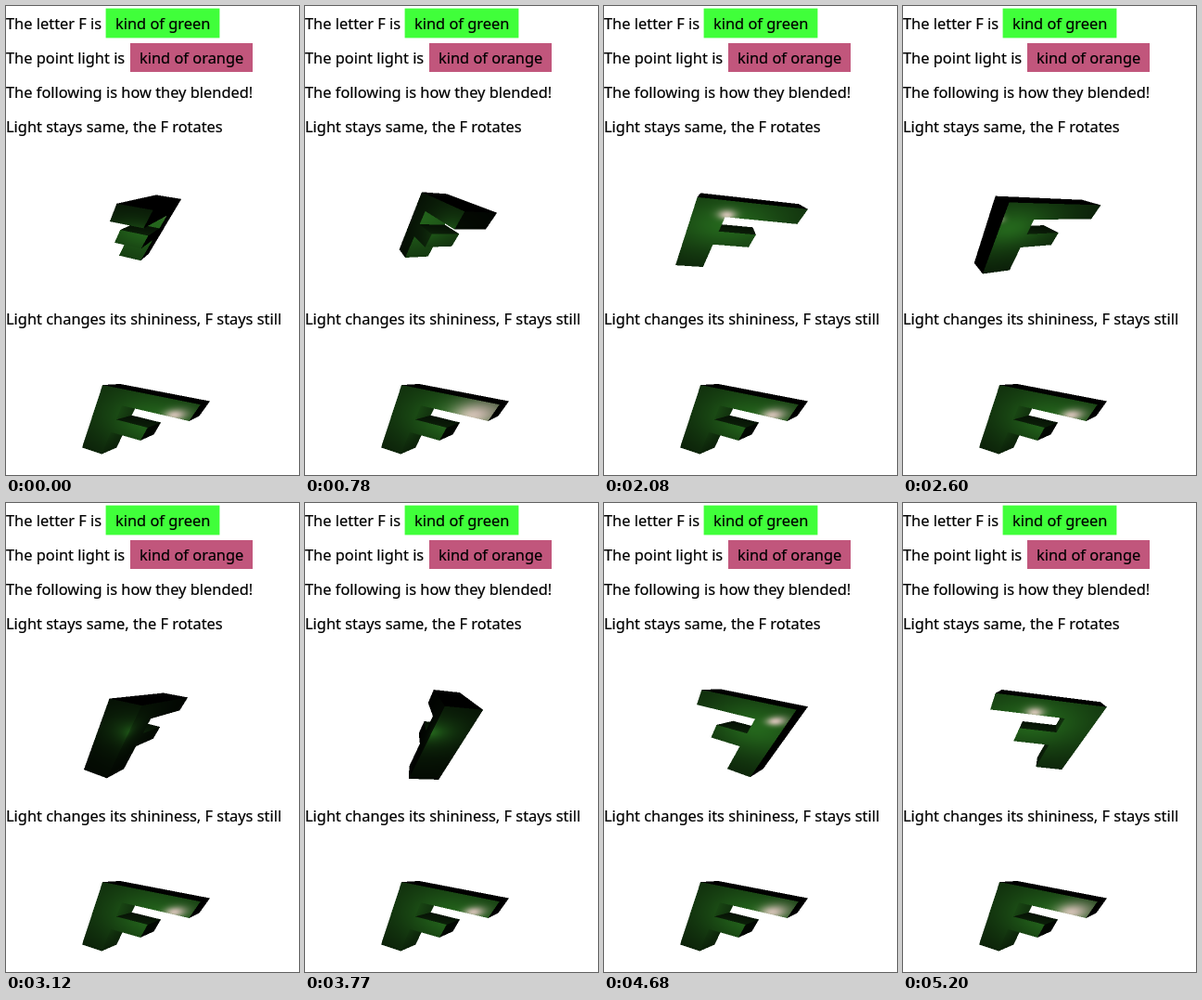
Recreate the animation shown at these times as an HTML page with a canvas. Size 316 by 505 pixels, loop 5.33 s.

```html
<!DOCTYPE html>
<html lang="en">
<head>
<meta charset="utf-8">
<title>Light and the letter F</title>
<style>
  html, body { margin: 0; width: 100%; height: 100%; overflow: hidden; background: #fff; }
  svg, canvas { position: absolute; left: 0; top: 0; display: block; }
  text { font: 16.4px "Noto Sans", "Open Sans", sans-serif; fill: #000; stroke: #000; stroke-width: 0.2px; }
</style>
</head>
<body>
<svg width="316" height="505">
  <rect x="107.6" y="2.6" width="122.8" height="31.8" fill="#40ff3a"/>
  <rect x="134" y="40" width="132" height="31" fill="#c1567c"/>
  <text x="0" y="25">The letter F is</text>
  <text x="118" y="25">kind of green</text>
  <text x="0" y="62">The point light is</text>
  <text x="144" y="62">kind of orange</text>
  <text x="0" y="99">The following is how they blended!</text>
  <text x="0" y="136">Light stays same, the F rotates</text>
  <text x="0" y="343">Light changes its shininess, F stays still</text>
</svg>
<canvas id="stage" width="316" height="505"></canvas>
<script>
const ctx = document.getElementById('stage').getContext('2d');
const LOOP = 5330, STEP = 130;

// [ms, value]: turn of the upper F in degrees, shininess of the lower one
const TURN = [[0, -104.5], [780, -60.5], [1430, -23.5], [2600, 36.5], [3770, 103], [4680, 153.5], [5200, 184]];
const SHINE = [[0, 130], [780, 28], [1430, 90], [2600, 140], [3770, 160], [4680, 85], [5200, 58]];
const REST = -23.5;

// The F as three boxes: [low corner, high corner]
const BOXES = [
  [[-50, -75, -15], [-20, 75, 15]],
  [[-20, 45, -15], [50, 75, 15]],
  [[-20, -15, -15], [17, 15, 15]]
];

const GREEN = [36, 102, 28];
const GLINT = [174, 100, 152];
const FX = 263, FY = 134.5, CX = 149.7;
const VIEW = { x: 72, w: 156, up: 36, h: 108 };

const dot = (a, b) => a[0] * b[0] + a[1] * b[1] + a[2] * b[2];
const mix = (a, p, b, q) => a.map((v, i) => v * p + b[i] * q);
const unit = a => { const n = Math.hypot(...a); return a.map(v => v / n); };

// Camera space: the F's upright axis, its horizontal partners and its centre
const UP = [0.2326, 0.8865, 0.4];
const TOWARD = [-0.1015, -0.3869, 0.9165];
const SIDE = [0.9673, -0.2538, 0];
const CENTRE = [-8.1, -31, -256];

function axes(deg) {
  const a = deg * Math.PI / 180, c = Math.cos(a), s = Math.sin(a);
  return [mix(SIDE, c, TOWARD, -s), UP, mix(TOWARD, c, SIDE, s)];
}
const toLocal = (v, frame) => frame.map(axis => dot(v, axis));

const rest = axes(REST);
const LIGHT = mix(mix(rest[0], 22, UP, 30), 1, rest[2], 60);

function track(keys, t) {
  let i = 0;
  while (i < keys.length - 2 && t > keys[i + 1][0]) i++;
  const [t0, v0] = keys[i], [t1, v1] = keys[i + 1];
  return v0 + (v1 - v0) * (t - t0) / (t1 - t0);
}

// Nearest hit of a ray with the boxes: distance, axis of the face, its sign
function hit(eye, ray) {
  let best = Infinity, face = 0;
  for (const [lo, hi] of BOXES) {
    let near = -Infinity, far = Infinity, axis = 0;
    for (let k = 0; k < 3; k++) {
      const a = (lo[k] - eye[k]) / ray[k], b = (hi[k] - eye[k]) / ray[k];
      const enter = Math.min(a, b);
      if (enter > near) { near = enter; axis = k; }
      far = Math.min(far, Math.max(a, b));
    }
    if (near < far && near < best) { best = near; face = axis; }
  }
  return best < Infinity ? { dist: best, axis: face, sign: ray[face] > 0 ? -1 : 1 } : null;
}

function shade(eye, ray, light, shine) {
  const h = hit(eye, ray);
  if (!h) return null;
  const point = mix(eye, 1, ray, h.dist);
  const toLight = unit(mix(light, 1, point, -1));
  const lit = toLight[h.axis] * h.sign;
  if (lit <= 0) return [0, 0, 0];
  const half = unit(mix(toLight, 1, unit(ray), -1));
  const spec = Math.pow(Math.max(0, half[h.axis] * h.sign), shine);
  return mix(GREEN, lit, GLINT, spec);
}

function drawF(cy, deg, shine) {
  const frame = axes(deg);
  const eye = toLocal(CENTRE.map(v => -v), frame);
  const light = toLocal(LIGHT, frame);
  const top = Math.round(cy - VIEW.up);
  const img = ctx.createImageData(VIEW.w, VIEW.h);
  for (let y = 0, o = 0; y < VIEW.h; y++) {
    for (let x = 0; x < VIEW.w; x++, o += 4) {
      let n = 0, sum = [0, 0, 0];
      for (let s = 0; s < 4; s++) {
        const px = VIEW.x + x + 0.25 + (s & 1) * 0.5;
        const py = top + y + 0.25 + (s >> 1) * 0.5;
        const ray = toLocal([(px - CX) / FX, (cy - py) / FY, -1], frame);
        const c = shade(eye, ray, light, shine);
        if (c) { n++; sum = mix(sum, 1, c, 1); }
      }
      if (!n) continue;
      for (let k = 0; k < 3; k++) img.data[o + k] = sum[k] / n;
      img.data[o + 3] = n * 255 / 4;
    }
  }
  ctx.putImageData(img, VIEW.x, top);
}

let shown = -1;
const start = performance.now();
function tick(now) {
  const step = Math.floor((Math.max(0, now - start) % LOOP) / STEP);
  if (step !== shown) {
    shown = step;
    const t = step * STEP;
    drawF(231, track(TURN, t), 180);
    drawF(437.7, REST, track(SHINE, t));
  }
  requestAnimationFrame(tick);
}
tick(start);
</script>
</body>
</html>
```
